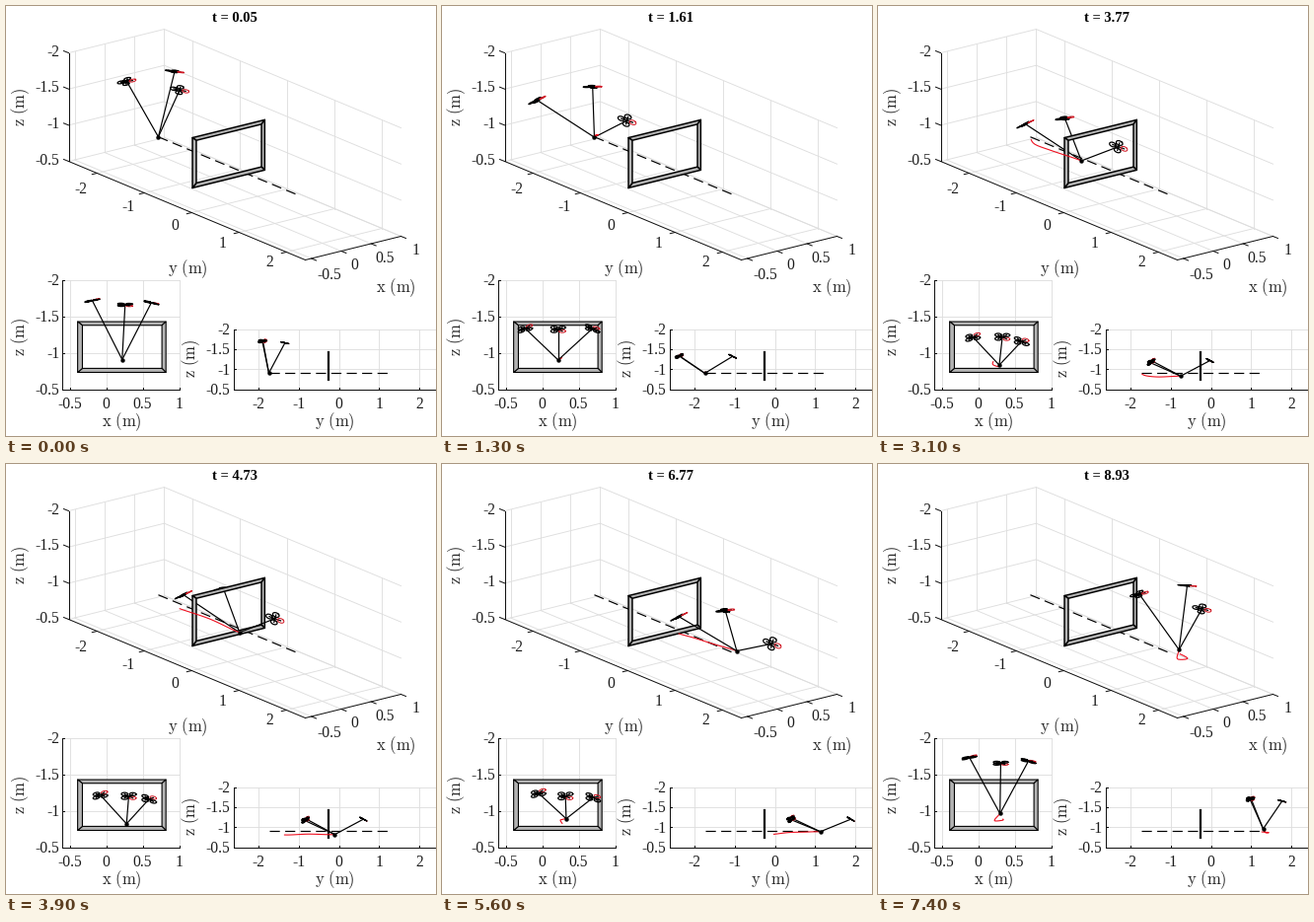
Animation of 436x436 px, one loop 7.5 s. Source, as a matplotlib script:

```python
import numpy as np
import matplotlib.pyplot as plt
from matplotlib.animation import FuncAnimation

SIZE, FRAMES, STEP = 436, 75, 100
PX = 0.72  # points per pixel at 100 dpi
TRAIL = 16
GATE_Y = -0.25
INK, GRID, GREY = "#111111", "#dedede", "#b4b4b4"

plt.rcParams["font.family"] = "Liberation Serif"
plt.rcParams["mathtext.fontset"] = "cm"

fig = plt.figure(figsize=(SIZE / 100, SIZE / 100), dpi=100, facecolor="white")
ax = fig.add_axes([0, 0, 1, 1])
ax.set_xlim(-0.5, SIZE - 0.5)
ax.set_ylim(SIZE - 0.5, -0.5)
ax.axis("off")


# ---- projections from metres to stage pixels
def iso(p):
    x, y, z = np.moveaxis(np.asarray(p, float), -1, 0)
    return (63 + 60.6 * (x + 0.6) + 48 * (y + 2.6),
            157 - 15 * (x + 0.6) + 20 * (y + 2.6) + 73.3 * (z + 0.5))


def front(p):
    x, _, z = np.moveaxis(np.asarray(p, float), -1, 0)
    return 101 + 74 * x, 277 + 74 * (z + 2)


def side(p):
    _, y, z = np.moveaxis(np.asarray(p, float), -1, 0)
    return 337 + 40.8 * y, 327 + 40.8 * (z + 2)


# ---- motion
def spline(keys, pts):
    """Cubic Hermite curve through pts, sampled once per frame."""
    keys, pts = np.array(keys, float), np.array(pts, float)
    slope = np.gradient(pts, keys, axis=0)
    f = np.arange(FRAMES)
    k = np.clip(np.searchsorted(keys, f, side="right") - 1, 0, len(keys) - 2)
    h = (keys[k + 1] - keys[k])[:, None]
    s = (f - keys[k])[:, None] / h
    return ((1 + 2 * s) * (1 - s) ** 2 * pts[k] + s * (1 - s) ** 2 * h * slope[k]
            + s * s * (3 - 2 * s) * pts[k + 1] + s * s * (s - 1) * h * slope[k + 1])


load = spline(
    [0, 5, 13, 18, 23, 31, 39, 45, 50, 56, 61, 66, 74],
    [(.22, -1.74, -.905), (.27, -1.72, -.93), (.22, -1.74, -.90),
     (.20, -1.62, -.84), (.27, -1.35, -.81), (.29, -.75, -.83),
     (.28, -.10, -.82), (.25, .35, -.87), (.28, .72, -.88),
     (.33, 1.13, -.89), (.34, 1.43, -.87), (.23, 1.37, -.86),
     (.30, 1.30, -.96)])

KEYS = [0, 13, 23, 39, 56, 66, 74]
cables = [spline(KEYS, c) for c in (
    [(-.41, -.15, -.81), (-.45, -.64, -.43), (-.38, -.71, -.38), (-.36, -.73, -.395),
     (-.38, -.74, -.35), (-.49, -.46, -.60), (-.42, -.31, -.77)],
    [(.04, .40, -.75), (0, .69, -.42), (.04, .74, -.39), (.03, .71, -.38),
     (-.01, .76, -.31), (-.01, .58, -.56), (.01, .47, -.69)],
    [(.40, -.16, -.78), (.47, -.63, -.43), (.34, -.72, -.33), (.31, -.73, -.34),
     (.37, -.71, -.29), (.43, -.46, -.58), (.39, -.32, -.72)])]


def unit(v):
    return v / np.linalg.norm(v)


def quad(center, cable):
    """Body strokes and the marked rotor of a tilted quadrotor."""
    n = unit(unit(cable) + np.array([0, 0, -1.2]))
    u = unit(np.array([1.0, 0, 0]) - n[0] * n)
    v = np.cross(n, u)
    v = v if v[1] > 0 else -v
    a = np.linspace(0, 2 * np.pi, 17)[:, None]
    ring = 0.045 * (np.cos(a) * u + np.sin(a) * v)
    hubs = [0.08 * (np.cos(q) * u + np.sin(q) * v)
            for q in np.pi / 4 + np.arange(4) * np.pi / 2]
    gap = np.full((1, 3), np.nan)
    body = []
    for h in hubs[1:]:
        body += [center + h + ring, gap]
    for i in (0, 1):
        body += [center + np.array([hubs[i], hubs[i + 2]]), gap]
    return np.vstack(body), center + hubs[0] + ring


# ---- static drawing
def line(xs, ys, color=INK, w=1.0, z=1, **kw):
    return ax.plot(xs, ys, color=color, lw=w * PX, zorder=z, **kw)[0]


def seg(view, a, b, **kw):
    return line(*view([a, b]), **kw)


def tick(x, y, v, ha="center"):
    ax.text(x, y + 5, f"{v:g}", fontsize=15.6 * PX, color="#1c1c1c", ha=ha, va="baseline")


def label(x, y, name, rot=0):
    ax.text(x, y, rf"$\mathrm{{{name}\ (m)}}$", fontsize=16.6 * PX, color="#262626",
            ha="center", va="center", rotation=rot)


X0, X1, Y0, Y1, Z0, Z1 = -0.6, 1, -2.6, 2.4, -2, -0.5
XT, YT, ZT = (-0.5, 0, 0.5, 1), (-2, -1, 0, 1, 2), (-2, -1.5, -1, -0.5)

grid = dict(color=GRID, w=0.9, z=0)
for x in XT:
    seg(iso, (x, Y0, Z0), (x, Y0, Z1), **grid)
    seg(iso, (x, Y0, Z1), (x, Y1, Z1), **grid)
    seg(front, (x, 0, Z0), (x, 0, Z1), **grid)
for y in YT:
    seg(iso, (X1, y, Z0), (X1, y, Z1), **grid)
    seg(iso, (X0, y, Z1), (X1, y, Z1), **grid)
    seg(side, (0, y, Z0), (0, y, Z1), **grid)
for z in ZT:
    seg(iso, (X0, Y0, z), (X1, Y0, z), **grid)
    seg(iso, (X1, Y0, z), (X1, Y1, z), **grid)
    seg(front, (X0, 0, z), (X1, 0, z), **grid)
    seg(side, (0, Y0, z), (0, Y1, z), **grid)

for a, b in (((X0, Y0, Z0), (X0, Y0, Z1)), ((X0, Y0, Z1), (X0, Y1, Z1)),
             ((X0, Y1, Z1), (X1, Y1, Z1))):
    seg(iso, a, b)
for view, end in ((front, (X1, 0, Z1)), (side, (0, Y1, Z1))):
    seg(view, (X0, Y0, Z0), (X0, Y0, Z1))
    seg(view, (X0, Y0, Z1), end)

for i, z in enumerate(ZT):
    px, py = iso((X0, Y0, z))
    line([px - 5, px], [py - 2, py])
    tick(54, py - 2, z, "right")
    for view, right in ((front, 54), (side, 227)):
        px, py = view((X0, Y0, z))
        line([px, px + 2], [py, py])
        tick(right, py + 0.5, z, "right")
for i, y in enumerate(YT):
    px, py = iso((X0, y, Z1))
    line([px - 5, px], [py + 1.2, py])
    tick(75 + 48 * i, 184 + 18.5 * i, y)
    px, py = side((0, y, Z1))
    line([px, px], [py - 2, py])
    tick(px, 402, y)
for x, (tx, ty) in zip(XT, ((327, 271), (353, 261), (384, 254), (415, 246))):
    px, py = iso((x, Y1, Z1))
    line([px, px + 5], [py, py + 2])
    tick(tx, ty, x)
    px, py = front((x, 0, Z1))
    line([px, px], [py - 2, py])
    tick(px, 402, x)

label(14, 102, "z", 90)
label(184, 266, "y")
label(395, 285, "x")
label(14, 335, "z", 90)
label(117, 421, "x")
label(187, 357, "z", 90)
label(333, 421, "y")
title = ax.text(231.5, 15, "", fontsize=14.6 * PX, weight="bold", color="black",
                ha="center", va="baseline")


def rect(x0, x1, z0, z1):
    return [(x0, GATE_Y, z0), (x1, GATE_Y, z0), (x1, GATE_Y, z1), (x0, GATE_Y, z1)]


outer = rect(-.39, .82, -1.425, -.73)
inner = rect(-.325, .765, -1.375, -.785)
for view, z, w in ((iso, 4, 1.5), (front, 1.5, 1.1)):
    for i in range(4):
        j = (i + 1) % 4
        ax.fill(*view([outer[i], outer[j], inner[j], inner[i]]), fc=GREY, ec="black",
                lw=w * PX, zorder=z, joinstyle="round")
seg(side, (0, GATE_Y, -1.43), (0, GATE_Y, -.73), color="black", w=2.2, z=3)

for view in (iso, side):
    seg(view, (.22, -1.74, -.905), (.22, 1.25, -.905), color="black", w=1.2, z=1.2,
        dashes=(8.5, 4.5))


# ---- moving parts
class Rig:
    def __init__(self, view):
        self.view = view
        mark = 0.05 if view is iso else -0.05
        self.mark = mark
        self.trail = line([], [], color="#ee1020", w=1.1, z=5)
        self.dot = line([], [], color="black", z=7, marker="o", ms=4.4 * PX, mew=0)
        self.ropes = [line([], [], color="black", w=1.2) for _ in cables]
        self.bodies = [line([], [], color="black", w=1.25) for _ in cables]
        self.rotors = [line([], [], color="#d01824", w=1.0) for _ in cables]

    def draw(self, f):
        put = lambda art, pts: art.set_data(*self.view(pts))
        put(self.trail, load[max(0, f - TRAIL):f + 1])
        put(self.dot, load[f:f + 1])
        for rope, body, rotor, c in zip(self.ropes, self.bodies, self.rotors, cables):
            pos = load[f] + c[f]
            shape, ring = quad(pos, c[f])
            put(rope, [load[f], pos])
            put(body, shape)
            put(rotor, ring)
            z = 3 if self.view is iso and pos[1] < GATE_Y else 6
            rope.set_zorder(z - 0.2)
            body.set_zorder(z)
            rotor.set_zorder(z + self.mark)


rigs = [Rig(v) for v in (iso, front, side)]


def update(f):
    title.set_text(f"t = {0.05 + 0.12 * f:.2f}")
    for rig in rigs:
        rig.draw(f)
    return []


anim = FuncAnimation(fig, update, frames=FRAMES, interval=STEP, repeat=True,
                     repeat_delay=0, blit=False)
plt.show()
```
